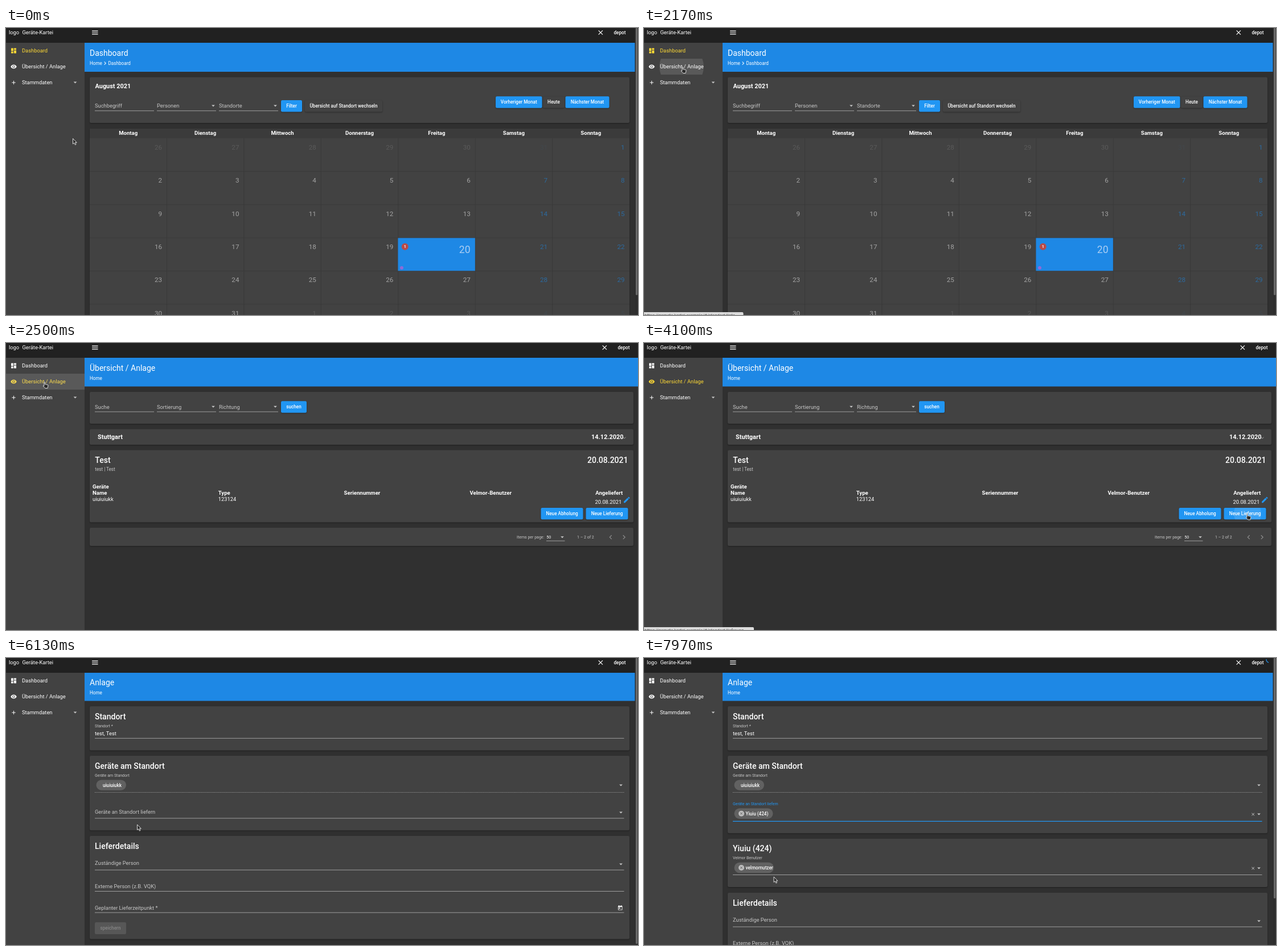
Animation of 1110 by 505 pixels, one loop 8000 ms. Source, as an HTML page:

```html
<!DOCTYPE html>
<html lang="de">
<head>
<meta charset="utf-8">
<title>Dashboard</title>
<style>
html, body { margin: 0; width: 100%; height: 100%; overflow: hidden; background: #303030; }
svg { display: block; width: 1110px; height: 505px; font-family: Roboto, sans-serif; }
text { white-space: pre; }
.up { filter: drop-shadow(0 1px 1px rgba(0, 0, 0, .35)); }
</style>
</head>
<body>
<svg viewBox="0 0 1110 505">
  <defs>
    <clipPath id="rowClip"><rect y="54" width="138" height="28"/></clipPath>
    <clipPath id="btnClip"><rect x="1018.5" y="290" width="74" height="20.5" rx="2.3"/></clipPath>
  </defs>
  <g id="page"></g>
  <g id="drop"></g>
  <g clip-path="url(#rowClip)"><circle id="rowRipple" cx="66" cy="68" fill="#fff"/></g>
  <g clip-path="url(#btnClip)"><circle id="btnRipple" cx="1060" cy="300" fill="#fff"/></g>
  <path id="spinner" d="M5 0A5 5 0 0 1 0 5" fill="none" stroke="#2196f3" stroke-width="1.2"/>
  <g id="status"></g>
  <g id="cursor" stroke="#eee" stroke-width=".9" stroke-linejoin="round" fill="#2b2b2b">
    <path id="arrow" d="M.5.5V10L2.8 8.2 4.4 11.6 6 10.9 4.5 7.6H7.3Z"/>
    <path id="hand" d="M.9 1.4Q1.6.2 2.4 1.4V5L7 6Q8 6.3 8 7.4L7 12H2.8L-.7 8.4Q-.6 7 .9 7.9Z"/>
  </g>
</svg>
<script>
const $ = id => document.getElementById(id);
const GREY = '#c6c6c6', BLUE = '#2196f3', HEAD = '#1e88e5', YELLOW = '#fdd835', CARD = '#424242';

const ICONS = {
  dash: 'M3 13h8V3H3zm0 8h8v-6H3zm10 0h8V11h-8zm0-18v6h8V3z',
  eye: 'M12 4.5C7 4.5 2.73 7.61 1 12c1.73 4.39 6 7.5 11 7.5s9.27-3.11 11-7.5c-1.73-4.39-6-7.5-11-7.5zM12 17a5 5 0 010-10 5 5 0 010 10zm0-8a3 3 0 000 6 3 3 0 000-6z',
  plus: 'M19 13h-6v6h-2v-6H5v-2h6V5h2v6h6z',
  menu: 'M3 18h18v-2H3zm0-5h18v-2H3zm0-7v2h18V6z',
  close: 'M19 6.4L17.6 5 12 10.6 6.4 5 5 6.4 10.6 12 5 17.6 6.4 19 12 13.4 17.6 19 19 17.6 13.4 12z',
  edit: 'M3 17.25V21h3.75L17.8 9.94l-3.75-3.75zM20.7 7.04a1 1 0 000-1.41l-2.34-2.34a1 1 0 00-1.41 0l-1.83 1.83 3.75 3.75z',
  date: 'M19 3h-1V1h-2v2H8V1H6v2H5a2 2 0 00-2 2v14a2 2 0 002 2h14a2 2 0 002-2V5a2 2 0 00-2-2zm0 16H5V8h14zM7 10h5v5H7z',
  right: 'M10 6L8.6 7.4 13.2 12l-4.6 4.6L10 18l6-6z',
  left: 'M15.4 7.4L14 6l-6 6 6 6 1.4-1.4L10.8 12z',
  down: 'M7 9.5L12 14.5 17 9.5 18 10.5 12 16.5 6 10.5z'
};

// y is the middle of the capitals
const text = (x, y, s, size = 9.33, fill = '#fff', weight = 400, anchor = 'start') =>
  `<text x="${x}" y="${y + .355 * size}" font-size="${size}" fill="${fill}" font-weight="${weight}" text-anchor="${anchor}">${s}</text>`;
const bold = (x, y, s, size = 9.6, anchor = 'start') => text(x, y, s, size, '#fff', 700, anchor);
const title = (x, y, s) => text(x, y, s, 14, '#fff', 500);
const box = (x, y, x2, y2, fill, r = 0, extra = '') =>
  `<rect x="${x}" y="${y}" width="${x2 - x}" height="${y2 - y}" rx="${r}" fill="${fill}" ${extra}/>`;
const card = (y, y2, right) => box(147, y, right, y2, CARD, 2.3, 'class="up"');
const rule = (x, x2, y, color = GREY, w = .7, extra = '') =>
  `<path d="M${x} ${y}H${x2}" stroke="${color}" stroke-width="${w}" ${extra}/>`;
const icon = (name, x, y, fill = '#fff', k = .583) =>
  `<path transform="translate(${x - 12 * k} ${y - 12 * k}) scale(${k})" d="${ICONS[name]}" fill="${fill}" fill-rule="evenodd"/>`;
const caret = (x, y, dir = 1) => `<path d="M${x - 2.9} ${y - 1.5 * dir}h5.8l-2.9 ${3 * dir}z" fill="${GREY}"/>`;
const button = (x, y, x2, s, fill = BLUE, color = '#fff') =>
  box(x, y, x2, y + 20.5, fill, 2.3, 'class="up"') + text((x + x2) / 2, y + 10.2, s, 8.17, color, 500, 'middle');
const smallField = (x, y, s, select) =>
  text(x, y, s, 9.33, GREY) + rule(x, x + 104, y + 8.7) + (select ? caret(x + 99, y) : '');
const chip = (y, x2, s, removable) =>
  box(158.5, y - 9.2, x2, y + 9.2, '#616161', 9.2) + text(removable ? 178.5 : 170, y, s, 8.17, '#fff', 500) +
  (removable ? `<circle cx="171" cy="${y}" r="5" fill="#bdbdbd"/>` + icon('close', 171, y, '#555', .3) : '');
const shift = (dy, s) => `<g transform="translate(0 ${dy})">${s}</g>`;

const header = (name, y2, right) => box(138, 26, right, y2, HEAD) + text(147, 44, name, 14) + text(147, 62, 'Home', 8.17);

// toolbar, side menu and scroll bar around a page
function frame(body, active, thumb) {
  const dx = thumb ? 0 : 7;
  const item = (i, glyph, s, k) => {
    const c = i === active ? YELLOW : '#fff', y = 40 + 28 * i;
    return icon(glyph, 13.5, y, c, k) + text(28, y, s, 9.33, c);
  };
  return body + box(0, 0, 1110, 26, '#212121') + box(0, 26, 138, 505, CARD) +
    text(5, 8, 'logo') + text(28.5, 8, 'Geräte-Kartei') + icon('menu', 156.3, 8) +
    icon('close', 1044.3 + dx, 8) + text(1067.5 + dx, 8, 'depot', 8.17, '#fff', 500) +
    item(0, 'dash', 'Dashboard', .5) + item(1, 'eye', 'Übersicht / Anlage', .47) +
    item(2, 'plus', 'Stammdaten', .45) + caret(121.5, 96) +
    (thumb ? box(1104.5, 0, 1110, 505, '#2e2e2e') + box(1106, 0, 1109.3, thumb, '#6b6b6b', 1.6) : '');
}

function dashboard() {
  const colW = 948 / 7, rowH = 58.4, top = 194;
  let s = header('Dashboard', 77, 1105) + icon('right', 174, 62, '#fff', .5) + text(179.5, 62, 'Dashboard', 8.17) +
    card(86.5, 167, 1095) + bold(156.5, 102.5, 'August 2021', 10.92) +
    smallField(156, 137, 'Suchbegriff') + smallField(265, 137, 'Personen', 1) + smallField(374, 137, 'Standorte', 1) +
    button(483, 127, 520, 'Filter') + button(525, 127, 661, 'Übersicht auf Standort wechseln', CARD) +
    button(943, 120.2, 981, 'Heute', CARD) + button(860, 120.2, 941.5, 'Vorheriger Monat') +
    button(982.5, 120.2, 1059.5, 'Nächster Monat') +
    box(147, 177, 1095, 505, CARD, 0, 'class="up"') + box(147, 177, 1095, top, '#3b3b3b');
  ['Montag', 'Dienstag', 'Mittwoch', 'Donnerstag', 'Freitag', 'Samstag', 'Sonntag'].forEach((d, i) =>
    s += bold(147 + colW * (i + .5), 184.7, d, 9.6, 'middle'));
  for (let r = 1; r < 6; r++) s += rule(147, 1095, top + r * rowH, '#393939', .8);
  for (let c = 1; c < 7; c++) s += `<path d="M${147 + c * colW} ${top}V505" stroke="#393939" stroke-width=".8"/>`;
  for (let i = 0; i < 42; i++) {
    const c = i % 7, r = Math.floor(i / 7), x = 147 + c * colW, y = top + r * rowH, d = i - 5;
    const inside = d > 0 && d < 32, weekend = c > 4;
    if (d === 20) {
      s += box(x - .3, y + .3, x + colW - .3, y + rowH - .3, HEAD) + text(815.5, 389.5, 20, 17.5, '#a9cdf3', 400, 'end') +
        '<circle cx="700.7" cy="384.7" r="6" fill="#b94a48"/>' + bold(700.7, 384.7, 1, 7, 'middle') +
        '<circle cx="695" cy="422" r="3" fill="#8e6bd8"/>';
      continue;
    }
    const color = inside ? (weekend ? '#2c6a9f' : '#a3a3a3') : (weekend ? '#42484d' : '#5a5a5a');
    s += text(x + colW - 8.4, y + 15.6, inside ? d : d < 1 ? d + 31 : d - 31, 11.67, color, 400, 'end');
  }
  return frame(s, 0, 470);
}

function overview() {
  let s = header('Übersicht / Anlage', 76.5, 1110) + card(86, 142, 1102) +
    smallField(156, 112.3, 'Suche') + smallField(265, 112.3, 'Sortierung', 1) + smallField(374, 112.3, 'Richtung', 1) +
    button(483, 102.2, 528, 'suchen') +
    card(151.5, 179, 1102) + bold(161, 165.3, 'Stuttgart', 10.92) + bold(1084.5, 165.3, '14.12.2020', 10.92, 'end') +
    icon('down', 1086, 166.5, GREY, .45) +
    card(188.5, 315.5, 1102) + title(156.3, 206.5, 'Test') + text(1092.5, 206.5, '20.08.2021', 14, '#fff', 500, 'end') +
    text(156.3, 221.7, 'test | Test', 8.17, GREY) + bold(152, 252.7, 'Geräte');
  ['Name', 'Type', 'Seriennummer', 'Velmor-Benutzer'].forEach((h, i) => s += bold(152 + 220.8 * i, 263.7, h));
  return frame(s + bold(1083.3, 263.7, 'Angeliefert', 9.6, 'end') +
    text(152, 274.5, 'uiuiuiukk') + text(372.7, 274.5, '123124') + text(1081.3, 280, '20.08.2021', 9.33, '#fff', 400, 'end') +
    icon('edit', 1090.3, 276, BLUE) +
    button(939.5, 290, 1013.5, 'Neue Abholung') + button(1018.5, 290, 1092.5, 'Neue Lieferung') +
    card(325, 357, 1102) + text(897, 341.7, 'Items per page:', 7, GREY) + text(949.3, 341.7, '50', 7) +
    rule(949, 981.5, 348.2) + caret(977, 341.7) + text(1003, 341.7, '1 – 2 of 2', 7, GREY) +
    icon('left', 1062, 341.7, '#8a8a8a', .65) + icon('right', 1085.5, 341.7, '#8a8a8a', .65), 1);
}

// loaded: 0 empty, 1 location known, 2 all; picked: 1 device chosen, 2 with user
function form({ loaded = 2, scroll = 0, focus = false, picked = 0, thumb = 0 }) {
  const right = thumb ? 1095 : 1102, end = right - 9.5, drop = right - 15;
  const a = loaded > 1 ? 0 : -5, b = picked ? 5 : 0, c = picked > 1 ? 0 : -5;
  const line = (y, color, w) => rule(156, end, y, color, w);
  const clear = y => icon('close', drop - 10.3, y, GREY, .36) + caret(drop, y);
  const label = 'Geräte an Standort liefern';
  let s = header('Anlage', 76.5, thumb ? 1105 : 1110) + card(86, 163.5, right) + title(156, 104, 'Standort') +
    text(156, 120.5, 'Standort *', 7, GREY) + (loaded ? text(156, 133.3, 'test, Test') : '') + line(142.3) +
    card(173, 304.3 + a + b, right) + title(156, 190.8, 'Geräte am Standort') +
    (loaded > 1 ? text(156, 207.7, 'Geräte am Standort', 7, GREY) + chip(224.6, 211, 'uiuiuiukk') :
      text(156, 220, 'Geräte am Standort', 9.33, GREY)) +
    caret(drop, 225 + a) + rule(156, end, 237.5 + a, GREY, .7, 'stroke-dasharray="1 1.2"');
  if (focus || picked) s += text(156, 257.5, label, 7, BLUE) + line(283.3 + b, BLUE, 1.3);
  else s += text(156, 271.5 + a, label, 9.33, GREY) + line(283 + a);
  if (picked) {
    s += chip(274.7, 226.5, 'Yiuiu (424)', 1) + clear(276) +
      card(319, 404 + c, right) + title(156, 336.5, 'Yiuiu (424)') +
      (c ? text(156, 365, 'Velmor Benutzer', 9.33, GREY) + caret(drop, 366) :
        text(156, 353, 'Velmor Benutzer', 7, GREY) + chip(370, 228, 'velmornutzer', 1) + clear(371)) + line(382.5 + c);
  } else s += caret(drop, 273 + a, focus ? -1 : 1);
  if (focus) s += box(156.3, 266.7, 157.2, 279, '#fff');
  s += shift(picked ? 100 + c : a, card(314, 495.5, right) + title(156, 332, 'Lieferdetails') +
    text(156, 362, 'Zuständige Person', 9.33, GREY) + caret(drop, 364) + line(374) +
    text(156, 403, 'Externe Person (z.B. VQK)', 9.33, GREY) + line(411.5) +
    text(156, 440.7, 'Geplanter Lieferzeitpunkt *', 9.33, GREY) + line(449) + icon('date', drop - 1.3, 440.7, '#fff', .42) +
    box(156, 466, 211, 487, '#575757', 2.3) + text(183.5, 476.5, 'speichern', 8.17, '#868686', 500, 'middle'));
  return frame(shift(-scroll, s), -1, thumb);
}

const SCENES = [
  [0, dashboard()],
  [2300, overview()],
  [4330, form({ loaded: 0 })],
  [4530, form({ loaded: 1 })],
  [4670, form({ thumb: 503 })],
  [6000, form({ thumb: 503, scroll: 1 })],
  [6330, form({ thumb: 503, scroll: 1, focus: true })],
  [7370, form({ thumb: 427, scroll: 1, picked: 1 })],
  [7630, form({ thumb: 423, scroll: 1, picked: 2 })]
];

$('drop').innerHTML = box(156, 283, 1085.7, 326, '#303333', 2, 'class="up"') + text(166, 298, 'Name: Yiuiu') +
  text(166, 312.7, '<tspan font-weight="700">Type:</tspan> aer | <tspan font-weight="700">Seriennummer:</tspan> 424 | <tspan font-weight="700">Velmor:</tspan>', 7.78);

// time, x, y
const PATH = [
  [0, 117, 194], [130, 117, 194], [270, 117, 189.5], [500, 117, 189.5], [900, 62.5, 124], [1130, 62.5, 124],
  [1230, 66, 67.5], [2550, 66, 67.5], [2900, 600, 255], [3000, 600, 255], [3800, 1058, 299], [4530, 1058, 299],
  [4530, 800, 380], [4670, 800, 380], [4670, 632.3, 304], [5130, 632.3, 304], [5230, 237, 318], [5370, 237, 318],
  [5470, 230, 321], [6000, 230, 321], [6250, 230, 268], [6670, 230, 268], [6970, 231.5, 294], [7630, 231.5, 294],
  [7940, 227.5, 384.5], [8000, 227.5, 384.5]
];

const lastAt = (list, t) => list.findLastIndex(k => k[0] <= t);
const ramp = (t, a, b) => Math.min(1, Math.max(0, (t - a) / (b - a)));
const within = (t, a, b) => t >= a && t < b;
const set = (id, o) => Object.entries(o).forEach(([k, v]) => $(id).setAttribute(k, v));
let shown = -1, link = '';

function draw(t) {
  const n = lastAt(SCENES, t);
  if (n !== shown) $('page').innerHTML = SCENES[shown = n][1];

  set('drop', { opacity: t < 7370 ? ramp(t, 6390, 6530) : 0 });
  set('rowRipple', { r: 140 * ramp(t, 2100, 2355), opacity: .12 * (1 - ramp(t, 2700, 2900)) });
  set('btnRipple', { r: 75 * ramp(t, 3970, 4376), opacity: t < 4330 ? .12 : 0 });

  const start = t < 7630 ? 4530 : 7630, age = Math.min(t - start, 370);
  set('spinner', {
    transform: `translate(1098 3) rotate(${(age - 140) * .5})`,
    opacity: within(t, 4530, 5130) || t >= 7630 ? 1 : 0
  });

  const second = t > 3000, w = second ? 193 : 174.5;
  const url = 'https://geraete-kartei.example/#/' + (second ? 'standort/lieferung' : 'standort/liste');
  if (url !== link) $('status').innerHTML = box(-4, 500, w, 512, '#dcdcdc', 2) + text(1, 505.6, link = url, 7.6, '#444');
  set('status', { opacity: second ? (within(t, 3790, 4330) ? 1 : 0) : t < 2300 ? ramp(t, 1370, 1430) : 0 });

  const i = lastAt(PATH, t), [t0, x0, y0] = PATH[i], [t1, x1, y1] = PATH[Math.min(i + 1, PATH.length - 1)];
  const u = ramp(t, t0, t1 || 1), e = u * u * (3 - 2 * u);
  const hand = within(t, 1180, 2600) || within(t, 3770, 4530) || within(t, 6800, 7370);
  set('cursor', { transform: `translate(${x0 + (x1 - x0) * e} ${y0 + (y1 - y0) * e})` });
  set('hand', { opacity: +hand });
  set('arrow', { opacity: +!hand });
}

const begin = performance.now();
function tick() {
  draw((performance.now() - begin) % 8000);
  requestAnimationFrame(tick);
}
tick();
</script>
</body>
</html>
```
